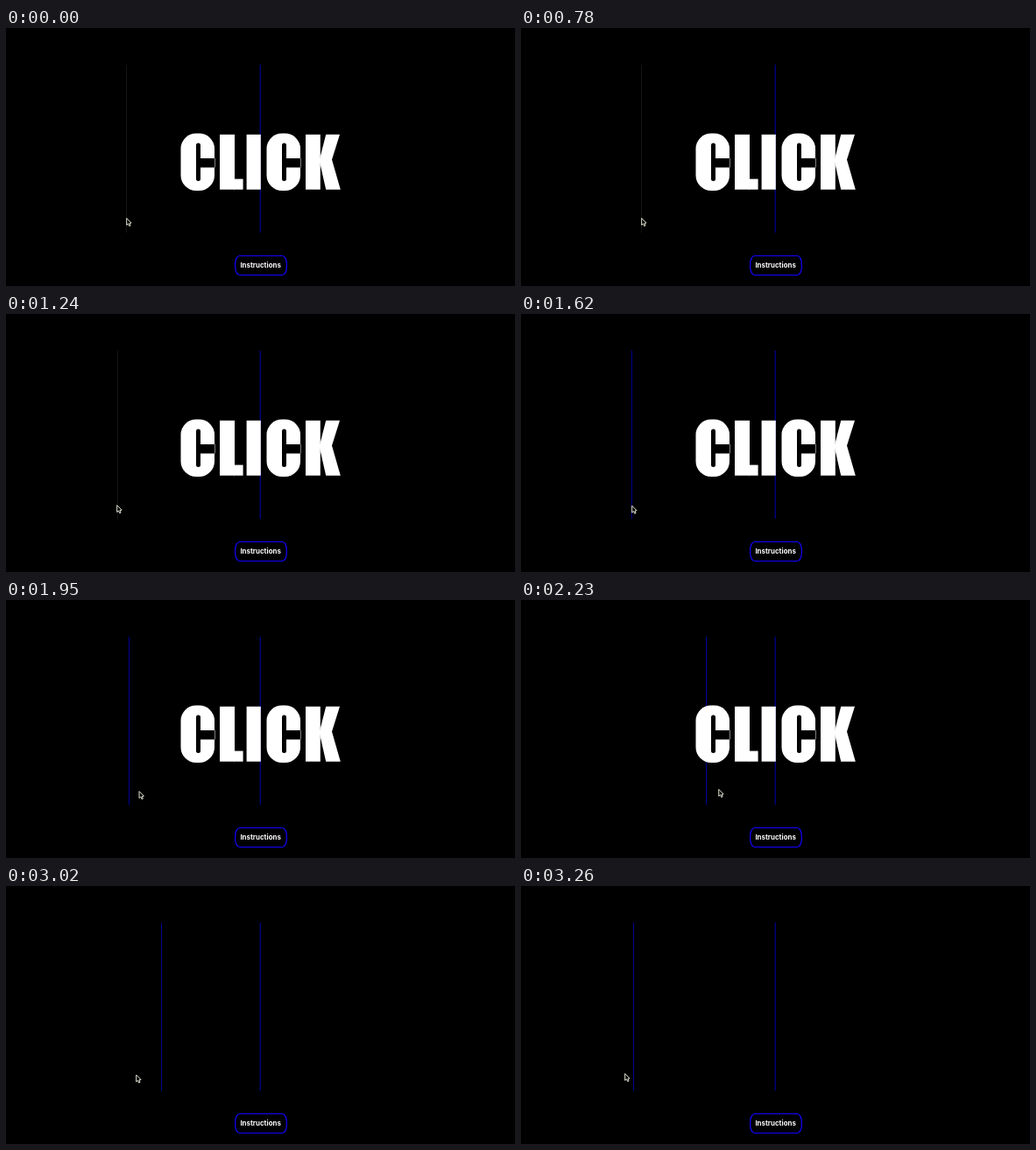
These frames come from a looping animation (581x295 px, 3.28 s). An HTML page with a canvas:

```html
<!DOCTYPE html>
<html lang="en">
<head>
<meta charset="utf-8">
<title>Click</title>
<style>
html, body { margin: 0; width: 100%; height: 100%; overflow: hidden; background: #000; }
canvas { display: block; width: 581px; height: 295px; }
</style>
</head>
<body>
<canvas id="stage" role="img" aria-label="CLICK"></canvas>
<script>
const W = 581, H = 295, LOOP = 3280;
const LAG = 55;          // time constant of the line chasing the pointer
const PAUSE = 100;
const pauses = [1240, 1850, 2410, 3020];
const CLICK_AT = 2800;

const canvas = document.getElementById('stage');
const ctx = canvas.getContext('2d');
const dpr = window.devicePixelRatio || 1;
canvas.width = W * dpr;
canvas.height = H * dpr;

// Pointer path: time without pauses, x, y
const path = [
  [780, 137, 217], [990, 136, 217], [1060, 133, 217], [1140, 126, 218],
  [1655, 126, 219], [2030, 225, 216], [2210, 239, 216], [2340, 241.5, 215],
  [2400, 237, 215], [2570, 235, 215], [2720, 148, 215.5], [2790, 126, 214], [2860, 118, 214]
];

const clamp = (v, lo, hi) => Math.min(hi, Math.max(lo, v));

// The motion stands still during each pause
const activeTime = t => pauses.reduce((sum, p) => sum - clamp(t - p, 0, PAUSE), t);

function pointerAt(t) {
  const next = path.findIndex(p => p[0] > t);
  if (next < 1) return (next === 0 ? path[0] : path[path.length - 1]).slice(1);
  const a = path[next - 1], b = path[next];
  const k = (t - a[0]) / (b[0] - a[0]);
  return [a[1] + (b[1] - a[1]) * k, a[2] + (b[2] - a[2]) * k];
}

// Exponentially weighted mean of the pointer's recent positions
function lineAt(t) {
  let sum = 0, total = 0;
  for (let s = 0; s < LAG * 7; s += 4) {
    const weight = Math.exp(-s / LAG);
    sum += weight * pointerAt(t - s)[0];
    total += weight;
  }
  return sum / total;
}

function fillPoly(...points) {
  ctx.beginPath();
  points.forEach(([x, y]) => ctx.lineTo(x, y));
  ctx.closePath();
  ctx.fill();
}

function letterC(x) {
  ctx.beginPath();
  ctx.roundRect(x, 120.5, 38.5, 65.5, 17.5);
  ctx.roundRect(x + 17.5, 131.5, 5, 43.5, 2.5);
  ctx.rect(x + 22.5, 149, 16.5, 10.5);
  ctx.fill('evenodd');
}

function drawWord() {
  const top = 121.8, base = 184.7, height = base - top;
  ctx.fillStyle = '#fff';
  letterC(199.5);
  ctx.fillRect(244, top, 17, height);
  ctx.fillRect(260, 172.6, 10.6, base - 172.6);
  ctx.fillRect(274.6, top, 16.2, height);
  letterC(297.5);
  ctx.fillRect(342, top, 16.8, height);
  fillPoly([358, 150], [365.2, top], [381, top], [372, 150.5],
    [381.8, base], [365.2, base], [358, 153]);
}

function drawButton() {
  ctx.strokeStyle = '#1400ff';
  ctx.lineWidth = 1.2;
  ctx.beginPath();
  ctx.roundRect(261.7, 260.5, 58.6, 22, { x: 5, y: 9 });
  ctx.stroke();
  ctx.fillStyle = '#fff';
  ctx.font = '700 7.9px Inter, "Open Sans", sans-serif';
  ctx.textAlign = 'center';
  ctx.fillText('Instructions', 290.6, 274);
}

function drawPointer([x, y]) {
  ctx.save();
  ctx.translate(x + 0.7, y + 0.5);
  ctx.fillStyle = '#000';
  ctx.strokeStyle = '#e4e4d4';
  ctx.lineWidth = 1;
  fillPoly([0, 0], [0, 7.8], [1.8, 6.3], [3, 9], [4.3, 8.4], [3.2, 5.8], [5.4, 5.5]);
  ctx.stroke();
  ctx.restore();
}

function drawLine(x, color) {
  ctx.fillStyle = color;
  ctx.fillRect(Math.round(x), 42, 1, 192);
}

function draw(t) {
  const now = activeTime(t);
  ctx.setTransform(dpr, 0, 0, dpr, 0, 0);
  ctx.fillStyle = '#000';
  ctx.fillRect(0, 0, W, H);

  drawLine(289, '#000030');
  drawLine(290, '#000080');
  drawLine(lineAt(now), t < pauses[0] + PAUSE ? '#141414' : '#000096');
  if (t < CLICK_AT) drawWord();
  drawButton();
  drawPointer(pointerAt(now));
}

const start = performance.now();
function tick() {
  draw((performance.now() - start) % LOOP);
  requestAnimationFrame(tick);
}
tick();
</script>
</body>
</html>
```
